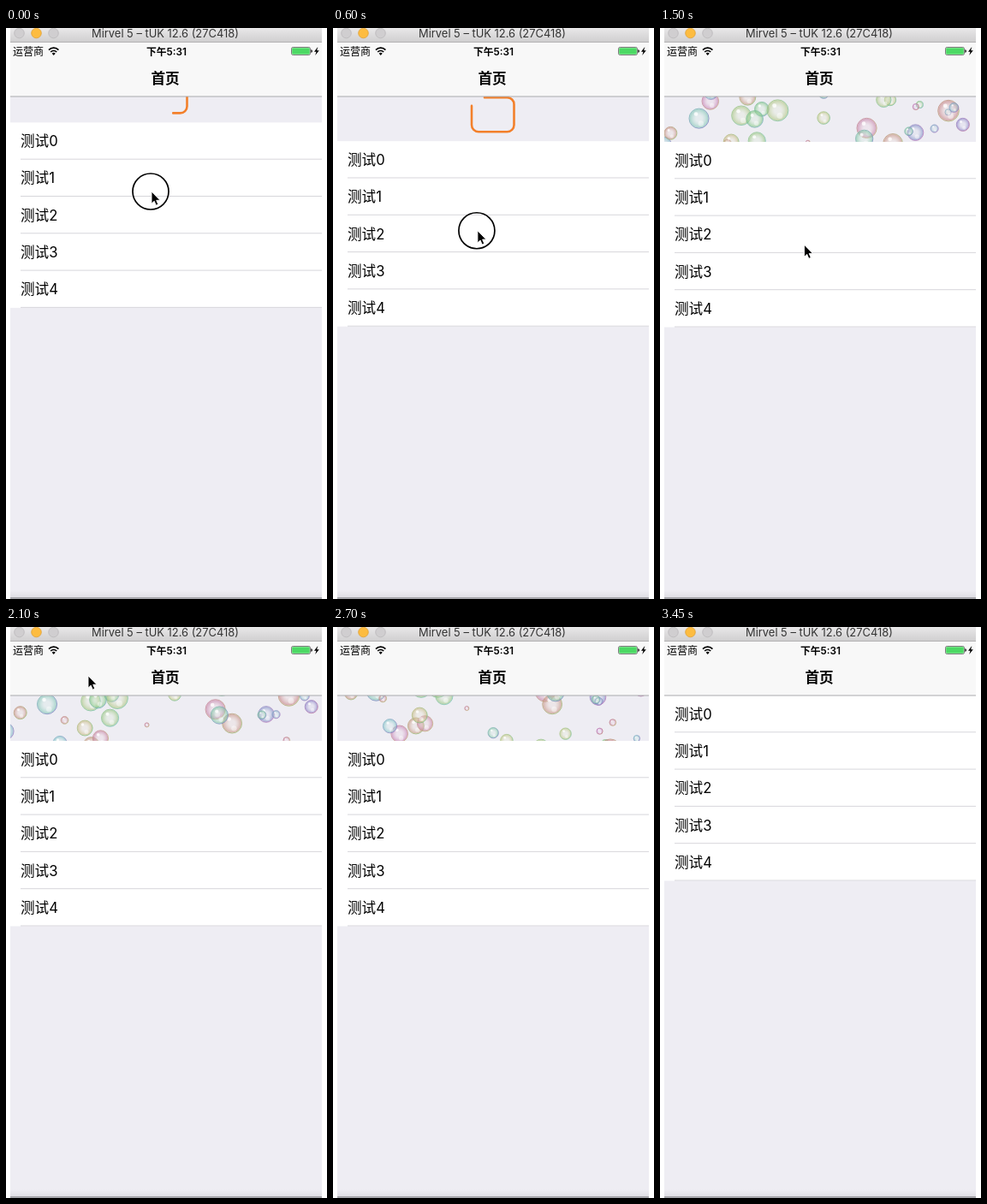
An HTML page with a canvas for the animation above (3600 ms loop, 375x667 px).

```html
<!DOCTYPE html>
<html lang="zh-CN">
<head>
<meta charset="utf-8">
<style>
html, body { margin: 0; width: 100%; height: 100%; overflow: hidden; background: #fff; }
canvas, svg { position: absolute; left: 0; top: 0; }
text { font-family: Inter, "Noto Sans CJK SC", "Noto Sans CJK", sans-serif; fill: #000; }
.mid { text-anchor: middle; }
</style>
</head>
<body>
<canvas id="stage" width="375" height="667"></canvas>
<svg width="375" height="667">
  <defs>
    <linearGradient id="chrome" x2="0" y2="1">
      <stop stop-color="#e9e8e9"/><stop offset="1" stop-color="#d0cfd0"/>
    </linearGradient>
    <linearGradient id="shade" x2="0" y2="1">
      <stop stop-opacity="0"/><stop offset="1" stop-opacity=".07"/>
    </linearGradient>
  </defs>
  <g id="list"><rect x="5" width="364" height="216.5" fill="#fff"/></g>

  <rect x="5" y="16" width="364" height="64" fill="#f8f8f8"/>
  <path d="M5 80H369" stroke="#a9a9ac"/>
  <rect x="5" width="364" height="16" fill="url(#chrome)"/>
  <path d="M5 16.5H369" stroke="#b3b2b3"/>
  <g stroke-width=".8">
    <circle cx="15.5" cy="6" r="5.8" fill="#d0ced0" stroke="#bab8ba"/>
    <circle cx="35.5" cy="6" r="5.8" fill="#fdbc40" stroke="#e0a033"/>
    <circle cx="55.5" cy="6" r="5.8" fill="#d0ced0" stroke="#bab8ba"/>
  </g>
  <text class="mid" x="186" y="11" font-size="12.9" style="fill:#333">Mirvel 5 – tUK 12.6 (27C418)</text>

  <text x="8" y="31.5" font-size="12">运营商</text>
  <g fill="none" stroke="#000" stroke-width="1.7">
    <path d="M50 25.6a8 8 0 0 1 11.4 0M52.2 28a5 5 0 0 1 7 0"/>
    <path d="M55.7 32l-2-2.2a2.9 2.9 0 0 1 4 0z" fill="#000" stroke="none"/>
  </g>
  <text class="mid" x="187.5" y="31.5" font-size="11.8" font-weight="600">下午5:31</text>
  <rect x="333.5" y="22.5" width="22" height="9" rx="1.8" fill="#fff" stroke="#444" stroke-width=".7"/>
  <rect x="334.2" y="23.2" width="20.6" height="7.6" rx="1" fill="#4cd964"/>
  <path d="M356.4 25v4q1.5-.6 1.5-2t-1.5-2zM364.3 22l-4.3 5.8h2.5l-1.3 4.2 4.6-5.8h-2.6z"/>
  <text class="mid" x="186" y="64.5" font-size="16.6" font-weight="600">首页</text>
  <rect x="5" y="657" width="364" height="9" fill="url(#shade)"/>
  <path d="M5 666H369" stroke="#66666a" stroke-width="1.2"/>

  <g id="pointer">
    <circle id="touch" cx="-1" r="21" fill="none" stroke="#000" stroke-width="1.7"/>
    <path d="M0 0V14.2L3.2 11.2L5.3 16.2L7.8 15.1L5.7 10.3H10z" stroke="#fff" stroke-width=".9"/>
  </g>
</svg>
<script>
const $ = id => document.getElementById(id);
const ctx = $('stage').getContext('2d');
const LOOP = 3600, TICK = 150, RELEASE = 1350, CLOSE = 3037;
const NAV = 80, START = 110.4, FULL = 140, OPEN = 133, ROW = 43.3;

for (let i = 0; i < 5; i++) {
  const y = ROW * (i + 1) - .5;
  $('list').innerHTML += `<text x="17" y="${ROW * i + 27.8}" font-size="16.6">测试${i}</text>
    <path d="M17 ${y}H369" stroke="#d3d2d7" stroke-width=".9"/>`;
}

let seed = 7;
const rand = () => (seed = seed * 16807 % 2147483647) / 2147483647;
const spread = range => (rand() - .5) * range;

// Two clusters near the sides and a sparse middle; drift in px per second
const bubbles = Array.from({ length: 32 }, (_, i) => ({
  x: i % 5 == 4 ? 190 + spread(120) : i % 2 ? 315 + spread(105) : 65 + spread(120),
  y: rand() * 80,
  dx: spread(36),
  dy: -20 - rand() * 25,
  r: 2.5 + 10 * rand(),
  hue: rand() * 360
}));

function disc(x, y, r, fill) {
  ctx.fillStyle = fill;
  ctx.beginPath();
  ctx.arc(x, y, r, 0, 7);
  ctx.fill();
}

function drawBubble({ x, y, dx, dy, r, hue }, seconds) {
  const height = 80;
  x += dx * seconds;
  y = NAV - 13 + ((y + dy * seconds) % height + height) % height;

  const tint = (turn, light, alpha) => `hsla(${hue + turn},38%,${light}%,${alpha})`;
  const film = ctx.createRadialGradient(x, y, 0, x, y, r);
  film.addColorStop(.3, tint(0, 85, .25));
  film.addColorStop(.9, tint(0, 64, .6));
  film.addColorStop(1, tint(40, 70, .3));
  disc(x, y, r, film);

  const rim = ctx.createLinearGradient(x - r, y - r, x + r, y + r);
  rim.addColorStop(0, tint(0, 62, .8));
  rim.addColorStop(1, tint(80, 58, .8));
  ctx.strokeStyle = rim;
  ctx.lineWidth = .9;
  ctx.stroke();
  disc(x - r * .3, y - r * .45, r * .2, 'rgba(255,255,255,.8)');
  disc(x + r * .2, y + r * .5, r * .28, 'rgba(255,255,255,.45)');
}

// Rounded outline that completes as the pull reaches its full length
function drawOutline(bottom, progress) {
  const left = 162, right = 211.5, top = bottom - 40, r = 8;
  const length = 2 * (right - left + 40) - 8 * r + 2 * Math.PI * r;
  ctx.beginPath();
  ctx.moveTo(177, top);
  ctx.arcTo(right, top, right, bottom, r);
  ctx.arcTo(right, bottom, left, bottom, r);
  ctx.arcTo(left, bottom, left, top, r);
  ctx.arcTo(left, top, right, top, r);
  ctx.closePath();
  ctx.strokeStyle = '#f3802b';
  ctx.lineWidth = 2.6;
  ctx.lineCap = 'round';
  ctx.setLineDash(progress < 1 ? [length * progress, length] : []);
  ctx.stroke();
  ctx.setLineDash([]);
}

function listTop(t) {
  if (t < RELEASE) return Math.min(FULL, START + t * .0363);
  const x = Math.min(1, Math.max(0, (t - CLOSE) / 300));
  return OPEN - (OPEN - NAV) * x * x * (3 - 2 * x);
}

function draw() {
  const t = Math.floor(performance.now() % LOOP / TICK) * TICK;
  const top = listTop(t), pulling = t < RELEASE;

  ctx.fillStyle = '#eeedf3';
  ctx.fillRect(5, NAV, 364, 587);
  ctx.save();
  ctx.beginPath();
  ctx.rect(5, NAV, 364, top - NAV);
  ctx.clip();
  if (pulling) drawOutline(top - 11, (top - NAV) / (FULL - NAV));
  else bubbles.forEach(b => drawBubble(b, (t - RELEASE) / 1000));
  ctx.restore();

  $('list').setAttribute('transform', `translate(0 ${top})`);
  const drag = Math.min(FULL, START + t * .0363) - START;
  const [px, py] = t < 2100 ? [170 - drag * .05, 191 + drag * 2.1] : [96, 57];
  $('pointer').setAttribute('transform', `translate(${px} ${py})`);
  $('pointer').style.display = t < 2250 ? '' : 'none';
  $('touch').style.display = pulling ? '' : 'none';
  requestAnimationFrame(draw);
}
draw();
</script>
</body>
</html>
```
